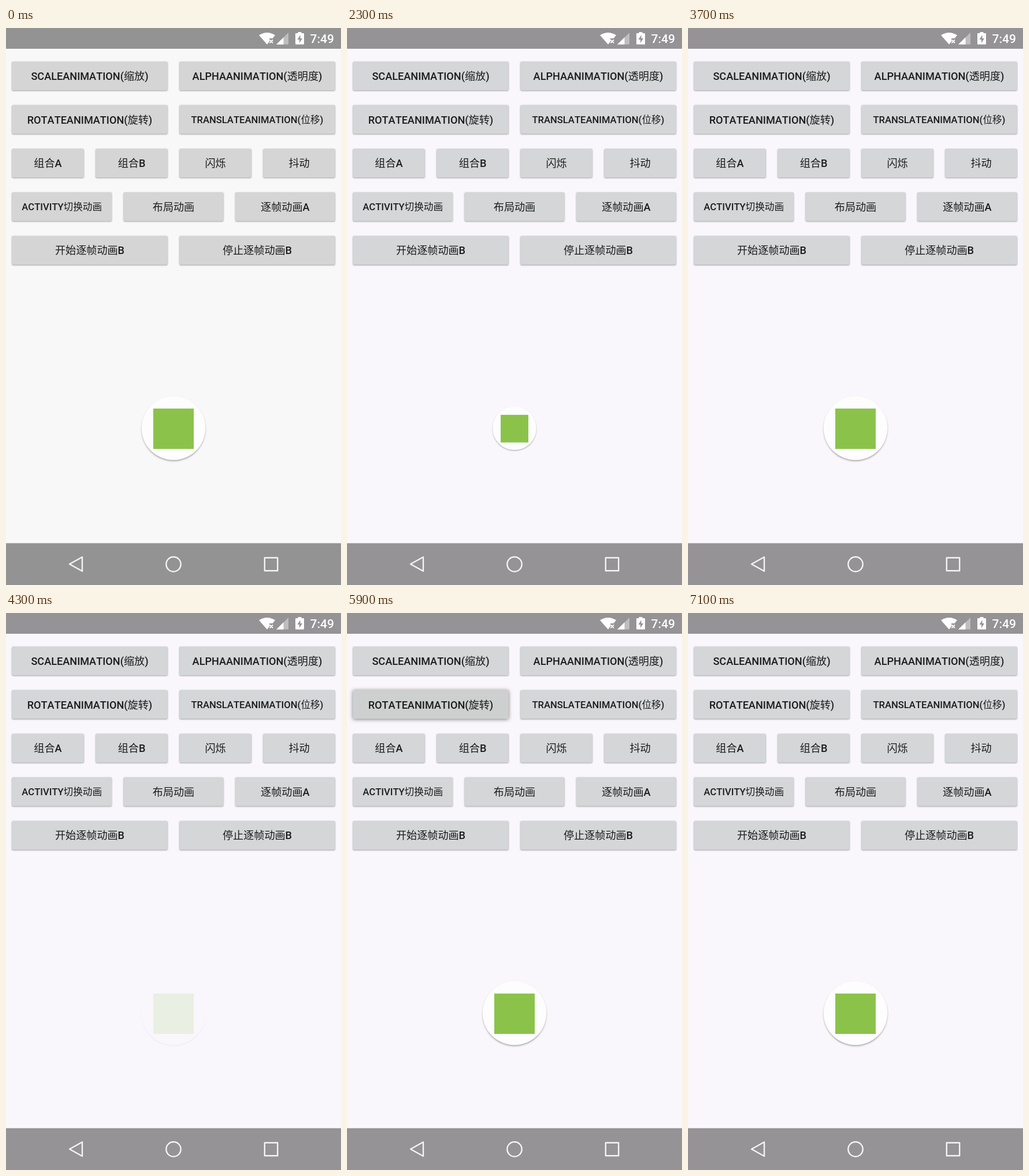
Animation of 580x966 px, one loop 8000 ms. Source, as an HTML page:

```html
<!DOCTYPE html>
<html lang="zh-CN">
<head>
<meta charset="utf-8">
<title>Animation demo</title>
<style>
  html, body { margin: 0; width: 100%; height: 100%; overflow: hidden; background: #f9f7fb; }
  svg { display: block; width: 580px; height: 966px; }
  text { font-family: Roboto, "Noto Sans CJK SC", "Noto Sans CJK", sans-serif; font-weight: 500; font-kerning: none; text-autospace: no-autospace; }
  .label { fill: #1b1b1c; text-anchor: middle; }
  .cjk { font-weight: 400; }
  .button { filter: drop-shadow(0 1px 1.2px rgba(0, 0, 0, .36)); }
  .button.raised { filter: drop-shadow(0 1.5px 3px rgba(0, 0, 0, .5)); }
  .shade { fill: #000; opacity: .33; filter: blur(1.4px); }
  .nav { fill: none; stroke: #f4f4f4; stroke-width: 2.4; stroke-linejoin: round; }
</style>
</head>
<body>
<svg viewBox="0 0 580 966">
  <rect id="page" width="580" height="966"/>
  <g id="bars">
    <rect width="580" height="36"/>
    <rect y="893.5" width="580" height="73"/>
  </g>

  <g fill="#fff">
    <path d="M438 12.5Q452 3.5 466 12.5L461.5 18H456V23.5L452 28.5Z"/>
    <path d="M456.5 20.5l5.5 5.5m0-5.5l-5.5 5.5" stroke="#fff" stroke-width="1.8"/>
    <path d="M489 8V28.5H468Z" opacity=".4"/>
    <path d="M480.5 16.3V28.5H468Z"/>
    <path fill-rule="evenodd" d="M505.5 7h6v2h3.5q1 0 1 1v17.500q0 1-1 1h-13q-1 0-1-1V10q0-1 1-1h3.500ZM509.500 12l-5 8h3.500v6l5-8h-3.500Z"/>
    <text x="526.500" y="26.300" font-size="21.100">7:49</text>
  </g>

  <g id="buttons"></g>

  <g id="icon">
    <circle class="shade" cx="290" cy="696" r="55"/>
    <circle cx="290" cy="694" r="55.300" fill="#fdfdfe"/>
    <rect x="255" y="660" width="70" height="70" fill="#8bc34a"/>
  </g>

  <g class="nav">
    <path d="M110 929.700L132 917.500V942Z"/>
    <circle cx="290" cy="930" r="12.700"/>
    <rect x="447.800" y="918.800" width="22.400" height="22.400"/>
  </g>
</svg>
<script>
const LOOP = 8000, CX = 290, CY = 694.5;
const LARGE = 18.13, SMALL = 16.62;
const ROWS = [
  ['SCALEANIMATION(缩放)', 'ALPHAANIMATION(透明度)'],
  ['ROTATEANIMATION(旋转)', 'TRANSLATEANIMATION(位移)'],
  ['组合A', '组合B', '闪烁', '抖动'],
  ['ACTIVITY切换动画', '布局动画', '逐帧动画A'],
  ['开始逐帧动画B', '停止逐帧动画B']
];
// button index, press time, shadow drops, tint ends
const PRESSES = [[0, 900, 1300, 1300], [1, 3900, 4100, 4100], [2, 5700, 6100, 6500]];

const $ = id => document.getElementById(id);
const page = $('page'), bars = $('bars'), icon = $('icon');

function add(parent, tag, attrs, text) {
  const el = document.createElementNS('http://www.w3.org/2000/svg', tag);
  for (const key in attrs) el.setAttribute(key, attrs[key]);
  if (text) el.textContent = text;
  return parent.appendChild(el);
}

function addButton(label, row, col, count) {
  const w = 580 / count, x = col * w, y = 58 + row * 75.6;
  const rect = add($('buttons'), 'rect', { class: 'button', x: x + 10.3, y, width: w - 20.6, height: 50, rx: 2 });
  const size = /^(TRANS|ACTIV)/.test(label) ? SMALL : LARGE;
  const text = add($('buttons'), 'text', { class: 'label', x: x + w / 2, y: y + 25.6 + size * .355, 'font-size': size });
  for (const part of label.match(/[\u4e00-\u9fff]+|[^\u4e00-\u9fff]+/g))
    add(text, 'tspan', part.charCodeAt(0) > 255 ? { class: 'cjk' } : {}, part);
  return rect;
}

const buttons = ROWS.flatMap((row, r) => row.map((label, c) => addButton(label, r, c, row.length)));

// accelerate, then decelerate
function ease(t, start, duration) {
  const p = Math.min(1, Math.max(0, (t - start) / duration));
  return (1 - Math.cos(Math.PI * p)) / 2;
}

function draw(t) {
  page.setAttribute('fill', t < 900 ? '#f8f8f8' : '#f9f7fb');
  bars.setAttribute('fill', t < 900 ? '#939393' : '#959395');

  buttons.forEach((button, i) => {
    const press = PRESSES.find(p => p[0] === i && t >= p[1] && t < p[3]);
    button.setAttribute('fill', press ? '#ced0cf' : t < 1300 ? '#d5d5d5' : '#d4d6d7');
    button.classList.toggle('raised', !!press && t < press[2]);
  });

  const scale = t < 1060 ? 1 : ease(t, 1060, 2000);
  const alpha = t < 4060 ? 1 : ease(t, 4060, 1000);
  const angle = 360 * ease(t, 6036, 1000);
  icon.setAttribute('transform', `translate(${CX} ${CY}) rotate(${angle}) scale(${scale}) translate(${-CX} ${-CY})`);
  icon.setAttribute('opacity', alpha);
  icon.setAttribute('visibility', scale < .005 ? 'hidden' : 'visible');
}

function tick() {
  draw(performance.now() % LOOP);
  requestAnimationFrame(tick);
}
tick();
</script>
</body>
</html>
```
